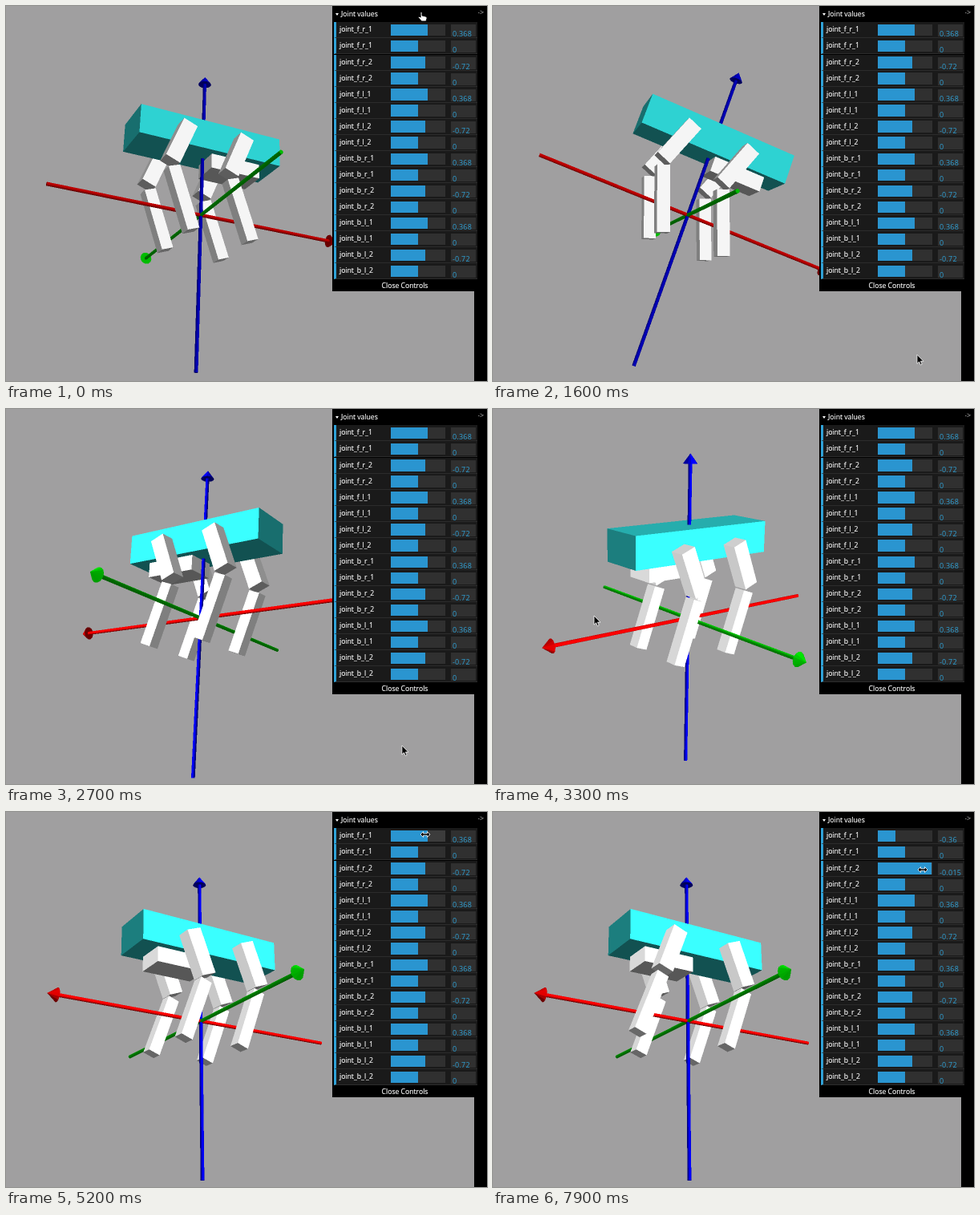
Recreate the animation shown at these times as an HTML page with a canvas. Size 600 by 468 pixels, loop 8 s.

```html
<!DOCTYPE html>
<html lang="en">
<head>
<meta charset="utf-8">
<title>Joint viewer</title>
<style>
html, body { margin: 0; width: 100%; height: 100%; overflow: hidden; }
body { position: relative; background: #000; font: 8.65px/20px "Open Sans", "DejaVu Sans", sans-serif; color: #fff; }
body * { position: absolute; box-sizing: border-box; white-space: nowrap; }
style, script { display: none; }
#view { left: 0; top: 0; width: 585px; height: 468px; }
#side { left: 584px; top: 0; width: 16px; height: 468px; background: #000; }
#side span { left: 4px; top: -2px; color: #bbb; font-size: 9px; }
#panel { left: 407px; top: 0; width: 182px; height: 356px; background: #000; -webkit-text-stroke: .15px; }
#title { left: 11px; top: 0; }
#fold { left: 4px; top: 9px; border: 2.2px solid transparent; border-top: 3.2px solid #fff; }
#close { left: 0; top: 342px; width: 181px; line-height: 14px; text-align: center; }
.row { left: 2px; width: 179px; height: 20px; background: #1a1a1a; border-bottom: 1px solid #2c2c2c; border-left: 3px solid #2fa1d6; }
.name { left: 4px; top: 0; line-height: 19px; }
.bar { left: 68px; top: 2.6px; width: 67.5px; height: 14.4px; background: #303030; }
.hot .bar { background: #3c3c3c; }
.fill { left: 0; top: 0; height: 100%; background: #2a95d0; }
.num { left: 143px; top: 3px; width: 31px; height: 15px; padding-left: 2px; background: #303030; color: #2fa1d6; font-size: 9px; line-height: 24px; letter-spacing: .2px; overflow: hidden; -webkit-text-stroke: 0; }
#cursor { left: 0; top: 0; width: 1px; height: 1px; overflow: visible; }
</style>
</head>
<body>
<canvas id="view" width="1170" height="936"></canvas>
<div id="side"><span>-&gt;</span></div>
<div id="panel">
  <div id="fold"></div><div id="title">Joint values</div>
  <div id="close">Close Controls</div>
</div>
<svg id="cursor">
  <path id="arrow" d="M0 0V11.2L2.6 8.8 4.4 12.8 6.2 12 4.5 8.1H8Z" fill="#000" stroke="#fff" stroke-width=".8"/>
  <path id="resize" d="M-6 0L-2.5-3.5V-1.2H2.5V-3.5L6 0 2.5 3.5V1.2H-2.5V3.5Z" fill="#000" stroke="#fff" stroke-width=".8"/>
  <path id="hand" d="M-1 1Q0-.6 1 1V5L6 6.2Q7.4 6.6 7 8.4L6 12H.4L-3.6 7.4Q-3.6 5.6-1.8 6.4L-.8 7.2Z" fill="#fff" stroke="#000" stroke-width=".9"/>
</svg>
<script>
const LOOP = 8000, STEP = 100;
const $ = id => document.getElementById(id);

const sub = (a, b) => a.map((v, i) => v - b[i]);
const dot = (a, b) => a.reduce((s, v, i) => s + v * b[i], 0);
const unit = a => { const l = Math.hypot(...a) || 1; return a.map(v => v / l); };
const cross = (a, b) => [a[1] * b[2] - a[2] * b[1], a[2] * b[0] - a[0] * b[2], a[0] * b[1] - a[1] * b[0]];
const clamp = (v, lo, hi) => Math.min(hi, Math.max(lo, v));
const ease = f => f * f * (3 - 2 * f);
const progress = (t, from, to) => ease(clamp((t - from) / (to - from), 0, 1));

// Trackball: a starting pose, then drags that each turn the view about a screen axis
const RED = [.905, -.184, -.382], BLUE = [.028, .925, -.379];
const DRAGS = [
  { from: 200, to: 1100, turn: [.083, -.408, .004] },
  { from: 1300, to: 2100, turn: [.325, .531, -.713] },
  { from: 2100, to: 3200, turn: [1.182, 2.977, .096] },
  { from: 3400, to: 4200, turn: [-.598, -.106, .027] }
];

function rotate(v, axis, a) {
  const c = Math.cos(a), s = Math.sin(a), along = dot(axis, v) * (1 - c), side = cross(axis, v);
  return v.map((x, i) => x * c + side[i] * s + axis[i] * along);
}

function viewAt(t) {
  return DRAGS.reduce((axes, { from, to, turn }) => {
    const angle = Math.hypot(...turn) * progress(t, from, to);
    return axes.map(v => rotate(v, unit(turn), angle));
  }, [RED, cross(BLUE, RED), BLUE]);
}

// Pointer stops: time, x, y
const STOPS = [
  [0, 518, 7], [300, 400, 330], [1100, 266, 375], [1700, 550, 440], [2100, 347, 408],
  [2500, 562, 450], [3300, 126, 258], [4500, 565, 14], [5200, 523, 28], [5500, 526.17, 28],
  [6000, 492, 28], [6400, 501.6, 28], [6700, 502, 38], [7200, 523.2, 72], [7600, 547, 72], [7900, 536, 72]
];

function pointer(t) {
  const i = Math.max(1, STOPS.findIndex(s => s[0] >= t));
  const [t0, x0, y0] = STOPS[i - 1], [t1, x1, y1] = STOPS[i];
  const f = progress(t, t0, t1);
  return [x0 + (x1 - x0) * f, y0 + (y1 - y0) * f];
}

// A slider follows the pointer between press and release
const BAR = 480, BAR_WIDTH = 67.5;
const dragged = (t, low, press, release) =>
  low + 2 * (pointer(clamp(t, press, release))[0] - BAR) / BAR_WIDTH;

// Small z-buffered renderer, drawn at double size
const SS = 2, W = 585 * SS, H = 468 * SS;
const CX = 243, CY = 261, SCALE = 195.5, PERSP = .21;
const ctx = $('view').getContext('2d');
const image = ctx.createImageData(W, H);
const pixels = new Uint32Array(image.data.buffer);
const depth = new Float32Array(W * H);
const rgb = (r, g, b) => (255 << 24 | b << 16 | g << 8 | r) >>> 0;
const BACK = rgb(160, 159, 160);
// Each light pair is the -/+ side of one world axis
const SHELL = { tint: [58, 262, 262], light: [[.42, .48], [.8, 1], [.31, .66]] };
const LIMB = { tint: [255, 255, 255], light: [[.52, .85], [.96, 1], [.34, .8]] };
const AXIS_LIGHT = [[.38, .44], [.68, 1.05], [.33, .75]];
let basis;

function project(p) {
  const v = [0, 1, 2].map(i => p[0] * basis[0][i] + p[1] * basis[1][i] + p[2] * basis[2][i]);
  const w = 1 / (1 - PERSP * v[2]);
  return [SS * (CX + SCALE * v[0] * w), SS * (CY - SCALE * v[1] * w), w];
}

function triangle(a, b, c, color) {
  const area = (b[0] - a[0]) * (c[1] - a[1]) - (b[1] - a[1]) * (c[0] - a[0]);
  if (Math.abs(area) < .01) return;
  const x0 = Math.max(0, Math.floor(Math.min(a[0], b[0], c[0])));
  const x1 = Math.min(W - 1, Math.ceil(Math.max(a[0], b[0], c[0])));
  const y0 = Math.max(0, Math.floor(Math.min(a[1], b[1], c[1])));
  const y1 = Math.min(H - 1, Math.ceil(Math.max(a[1], b[1], c[1])));
  for (let y = y0; y <= y1; y++) for (let x = x0; x <= x1; x++) {
    const px = x + .5, py = y + .5;
    const u = ((px - a[0]) * (c[1] - a[1]) - (py - a[1]) * (c[0] - a[0])) / area;
    const v = ((b[0] - a[0]) * (py - a[1]) - (b[1] - a[1]) * (px - a[0])) / area;
    if (u < 0 || v < 0 || u + v > 1) continue;
    const w = a[2] + u * (b[2] - a[2]) + v * (c[2] - a[2]), i = y * W + x;
    if (w > depth[i]) { depth[i] = w; pixels[i] = color; }
  }
}

function poly(points, { tint, light }) {
  const n = unit(cross(sub(points[1], points[0]), sub(points[2], points[0])));
  const lit = n.reduce((s, v, i) => s + v * v * light[i][v > 0 ? 1 : 0], 0);
  const color = rgb(...tint.map(v => Math.min(255, Math.round(v * lit))));
  const q = points.map(project);
  for (let i = 2; i < q.length; i++) triangle(q[0], q[i - 1], q[i], color);
}

function box(lo, hi, material, place = p => p) {
  for (let i = 0; i < 3; i++) for (const side of [lo, hi]) {
    const j = (i + 1) % 3, k = (i + 2) % 3;
    const quad = [[lo, lo], [hi, lo], [hi, hi], [lo, hi]].map(([a, b]) => {
      const p = [];
      p[i] = side[i]; p[j] = a[j]; p[k] = b[k];
      return place(p);
    });
    poly(side === lo ? quad.reverse() : quad, material);
  }
}

function ring(axis, at, r) {
  return Array.from({ length: 12 }, (_, m) => {
    const p = [], a = m * Math.PI / 6;
    p[axis] = at;
    p[(axis + 1) % 3] = r * Math.cos(a);
    p[(axis + 2) % 3] = r * Math.sin(a);
    return p;
  });
}

function tube(axis, from, to, r0, r1, material) {
  const a = ring(axis, from, r0), b = ring(axis, to, r1);
  a.forEach((p, m) => {
    const n = (m + 1) % a.length;
    poly([p, a[n], b[n], b[m]], material);
  });
  poly(a.slice().reverse(), material);
  if (r1) poly(b, material);
}

function leg(x, y, hip, knee) {
  const joint = (px, pz, a) => ([u, v, w]) =>
    [px + u * Math.cos(a) + w * Math.sin(a), y + v, pz - u * Math.sin(a) + w * Math.cos(a)];
  const upper = joint(x, .5, hip);
  const [kx, , kz] = upper([0, 0, -.3]);
  box([-.05, -.05, -.3], [.05, .05, 0], LIMB, upper);
  box([-.04, -.04, -.45], [.04, .04, -.04], LIMB, joint(kx, kz, hip + knee));
}

const REST = { hip: .368, knee: -.72 };

function drawScene(t, hip, knee) {
  basis = viewAt(t);
  pixels.fill(BACK);
  depth.fill(0);
  for (let i = 0; i < 3; i++) {
    const tint = [0, 0, 0];
    tint[i] = 275;
    const material = { tint, light: AXIS_LIGHT };
    tube(i, -1, .97, .0115, .0115, material);
    tube(i, .97, 1.03, .044, 0, material);
  }
  box([-.5, -.15, .4], [.5, .15, .6], SHELL);
  box([.02, -.1, .3], [.37, .1, .4], LIMB);
  for (const x of [.2, -.2]) for (const y of [.2, -.2]) {
    const moved = x > 0 && y > 0;
    leg(x, y, moved ? hip : REST.hip, moved ? knee : REST.knee);
  }
  ctx.putImageData(image, 0, 0);
}

// Control panel
const ROW_TOP = 20.4, ROW_STEP = 20.07;
const rows = [];
for (const end of 'fb') for (const side of 'rl') for (const n of [1, 2]) for (const active of [true, false]) {
  const el = document.createElement('div');
  el.className = 'row';
  el.style.top = ROW_TOP + rows.length * ROW_STEP + 'px';
  el.innerHTML = `<div class="name">joint_${end}_${side}_${n}</div>
    <div class="bar"><div class="fill"></div></div><div class="num"></div>`;
  $('panel').append(el);
  const row = { el, low: active && n === 2 ? -2 : -1 };
  rows.push(row);
  setRow(row, active ? (n === 1 ? REST.hip : REST.knee) : 0);
}

function setRow({ el, low }, value) {
  el.querySelector('.fill').style.width = (value - low) * 50 + '%';
  el.querySelector('.num').textContent = parseFloat(value.toFixed(3));
}

function drawCursor(t) {
  const [x, y] = pointer(t);
  const row = Math.floor((y - ROW_TOP) / ROW_STEP), inRow = (y - ROW_TOP) % ROW_STEP;
  const onBar = x >= BAR && x <= BAR + BAR_WIDTH && row >= 0 && row < rows.length && inRow > 2 && inRow < 17;
  const kind = onBar ? 'resize' : x > 407 && y < 20 ? 'hand' : 'arrow';
  for (const id of ['arrow', 'resize', 'hand']) $(id).style.display = id === kind ? '' : 'none';
  $('cursor').style.transform = `translate(${x}px, ${y}px)`;
  rows.forEach((r, i) => r.el.classList.toggle('hot', onBar && i === row));
}

let last = -1;
const start = performance.now();
function tick(now) {
  const t = Math.floor(Math.max(0, now - start) % LOOP / STEP) * STEP;
  if (t !== last) {
    last = t;
    const hip = dragged(t, rows[0].low, 5500, 6400);
    const knee = dragged(t, rows[2].low, 7200, 7600);
    drawScene(t, hip, knee);
    setRow(rows[0], hip);
    setRow(rows[2], knee);
    drawCursor(t);
  }
  requestAnimationFrame(tick);
}
tick(start);
</script>
</body>
</html>
```
